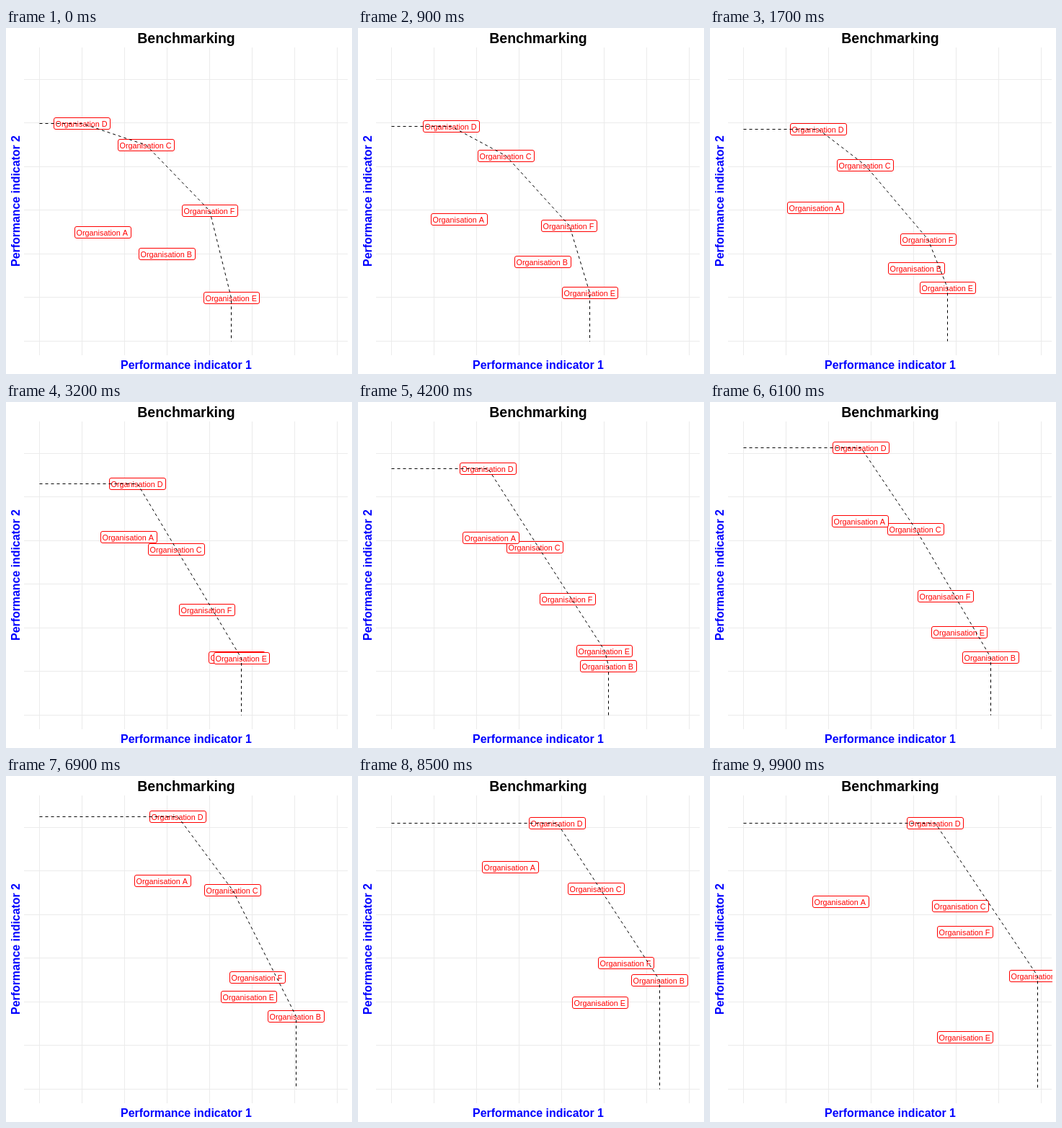
Write an HTML page with a canvas that moves like this. It is 480 by 480 pixels and loops after 10 s.

```html
<!DOCTYPE html>
<html lang="en">
<head>
<meta charset="utf-8">
<title>Benchmarking</title>
<style>
  html, body { margin: 0; width: 100%; height: 100%; overflow: hidden; background: #fff; }
  canvas { display: block; }
</style>
</head>
<body>
<canvas id="stage" width="480" height="480"></canvas>
<script>
const ctx = document.getElementById('stage').getContext('2d');
const FONT = '"Liberation Sans", Arial, sans-serif';
const STEP = 100, STEPS = 100;
const AXIS_X = 46, AXIS_Y = 434;

// Steps at which the organisations turn; between them they move evenly.
const turns = [0, 17, 32, 52, 69, 85, 99];

// Label centres at each turn, listed in drawing order.
const routes = {
  D: [[105, 132], [150, 140], [182, 113], [177, 71], [238, 56], [276, 65], [312, 65]],
  C: [[194, 162], [215, 190], [236, 204], [253, 197], [314, 158], [330, 156], [347, 180]],
  F: [[282, 253], [302, 293], [278, 288], [302, 257], [348, 279], [371, 259], [353, 216]],
  A: [[134, 283], [146, 249], [170, 187], [198, 188], [217, 145], [211, 126], [181, 174]],
  B: [[223, 313], [286, 333], [320, 354], [374, 378], [402, 333], [418, 283], [454, 277]],
  E: [[312, 374], [329, 360], [326, 355], [357, 334], [336, 306], [335, 314], [353, 362]]
};

function position(route, step) {
  const i = Math.min(turns.findLastIndex(t => t <= step), turns.length - 2);
  const u = (step - turns[i]) / (turns[i + 1] - turns[i]);
  return route[i].map((a, axis) => a + (route[i + 1][axis] - a) * u);
}

// Upper hull from the left axis, around the best performers, to the bottom axis.
function frontier(points) {
  const top = Math.min(...points.map(p => p[1]));
  const right = Math.max(...points.map(p => p[0]));
  const sorted = [...points, [AXIS_X, top], [right, AXIS_Y]]
    .sort((a, b) => a[0] - b[0] || a[1] - b[1]);
  const cross = (a, b, c) => (b[0] - a[0]) * (c[1] - a[1]) - (b[1] - a[1]) * (c[0] - a[0]);
  const hull = [];
  for (const p of sorted) {
    while (hull.length > 1 && cross(hull.at(-2), hull.at(-1), p) <= 0) hull.pop();
    hull.push(p);
  }
  return hull;
}

function text(str, x, y, size, color, weight = 'bold', align = 'center') {
  ctx.font = `${weight} ${size}px ${FONT}`;
  ctx.fillStyle = color;
  ctx.textAlign = align;
  ctx.fillText(str, x, y);
}

function drawChart() {
  ctx.fillStyle = '#fff';
  ctx.fillRect(0, 0, 480, 480);
  ctx.fillStyle = '#ebebeb';
  for (let i = 0; i < 8; i++) ctx.fillRect(AXIS_X + 59 * i, 27, 1, 427);
  for (let i = 0; i < 7; i++) ctx.fillRect(25, Math.floor(AXIS_Y + 0.4 - 60.5 * i), 449, 1);
  text('Benchmarking', 250, 21, 19.5, '#000');
  text('Performance indicator 1', 250, 473, 15.9, '#00f');
  ctx.save();
  ctx.translate(19, 240);
  ctx.rotate(-Math.PI / 2);
  text('Performance indicator 2', 0, 0, 15.9, '#00f');
  ctx.restore();
}

function drawLabel(name, [x, y]) {
  const width = 'EF'.includes(name) ? 77 : 78;
  const left = Math.round(x - width / 2), top = Math.round(y) - 8;
  ctx.beginPath();
  ctx.roundRect(left + 0.5, top + 0.5, width, 16, 2.5);
  ctx.fillStyle = '#fff';
  ctx.fill();
  ctx.strokeStyle = '#f00';
  ctx.stroke();
  text('Organisation ' + name, left + 2.6, top + 13, 10.8, '#f00', 'normal', 'left');
}

function drawFrontier(points) {
  ctx.beginPath();
  for (const [x, y] of frontier(points)) ctx.lineTo(Math.round(x) + 0.5, Math.round(y) + 0.5);
  ctx.setLineDash([4, 4]);
  ctx.strokeStyle = '#000';
  ctx.stroke();
  ctx.setLineDash([]);
}

function draw() {
  const step = Math.floor(performance.now() / STEP) % STEPS;
  const places = Object.entries(routes).map(([name, route]) => [name, position(route, step)]);
  drawChart();
  ctx.save();
  ctx.beginPath();
  ctx.rect(25, 27, 450, 427);
  ctx.clip();
  ctx.lineWidth = 1;
  for (const [name, place] of places) drawLabel(name, place);
  drawFrontier(places.map(([, place]) => place));
  ctx.restore();
  requestAnimationFrame(draw);
}
draw();
</script>
</body>
</html>
```
